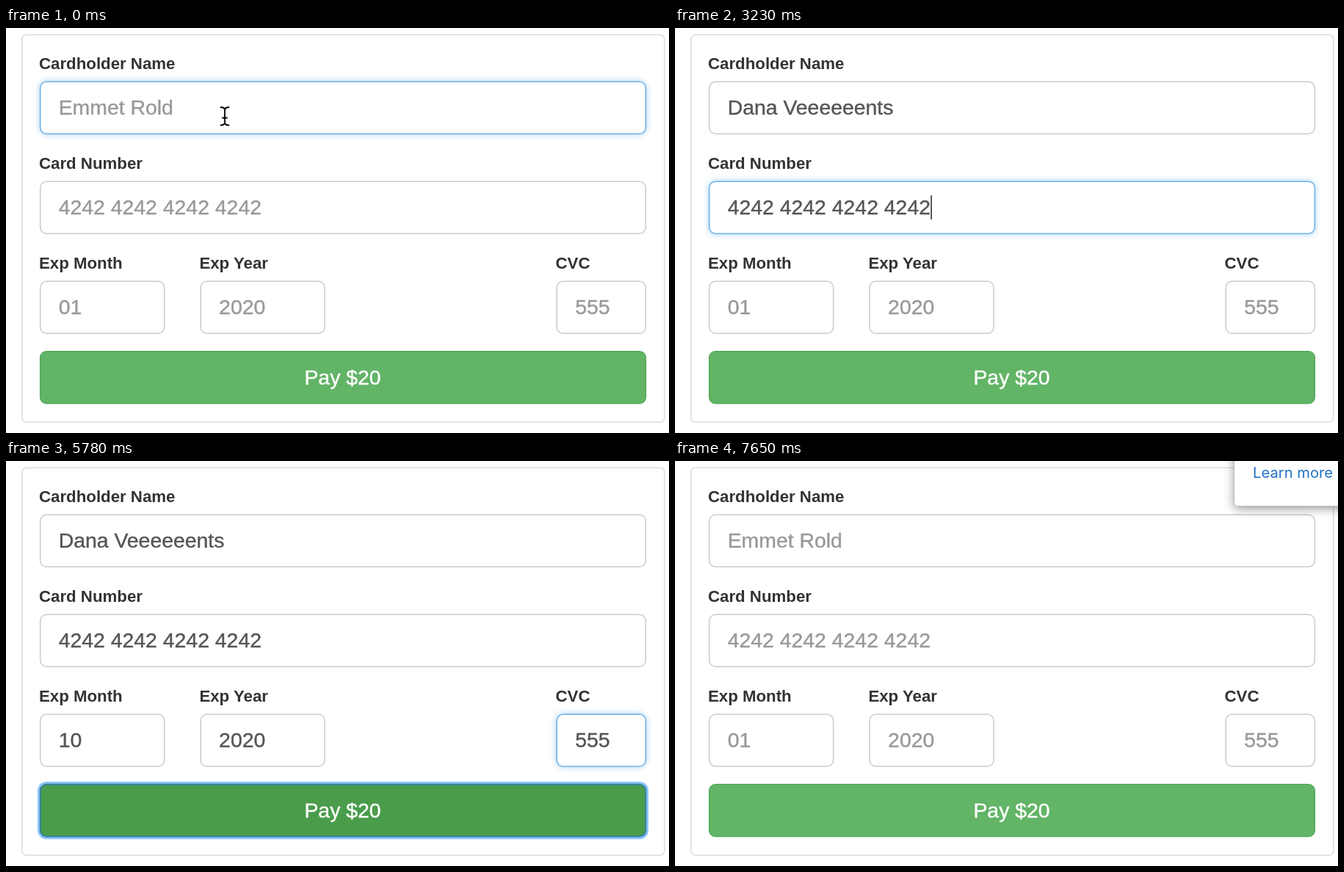
Animation, 903 px wide and 552 px high, one loop 7.82 s. Source, as an HTML page:

```html
<!DOCTYPE html>
<html lang="en">
<head>
<meta charset="utf-8">
<title>Card payment form</title>
<style>
  html, body { margin: 0; width: 100%; height: 100%; overflow: hidden; background: #fff; }
  svg { display: block; font: 28.4px "Liberation Sans", Arial, sans-serif; }
  rect { stroke-width: 1.58; }
  .panel { fill: #fff; stroke: #ddd; }
  .label { font-size: 22.25px; font-weight: bold; fill: #333; }
  .field { fill: #fff; stroke: #ccc; }
  .focus { stroke: #70b3e5; filter: drop-shadow(0 0 4px rgba(102, 175, 233, .6)); }
  .hint, .value, .caption { stroke-width: .4; }
  .hint { fill: #999; stroke: #999; }
  .value { fill: #555; stroke: #555; }
  .caret { fill: #333; }
  .list { fill: #fff; stroke: #a9c8e6; }
  .option { font: bold 19.75px "DejaVu Sans", sans-serif; }
  .pay { fill: #62b467; stroke: #55a95a; }
  .pressed { fill: #4a9c4b; stroke: #3781a6; stroke-width: 2; }
  .ring { fill: none; stroke: #8fc6fc; stroke-width: 4; filter: blur(.5px); }
  .waiting { fill: #9ed0a1; stroke: #95cb99; }
  .caption { fill: #fff; stroke: #fff; text-anchor: middle; }
  .popup { fill: #fff; stroke: #bbb; stroke-width: 1; filter: drop-shadow(0 3px 7px rgba(0, 0, 0, .4)); }
  .link { font: 20.2px Inter, sans-serif; fill: #2472c4; }
  .pointer { fill: none; stroke-linecap: round; }
</style>
</head>
<body>
<svg id="stage" width="903" height="552" viewBox="0 0 903 552"></svg>
<script>
const STEP = 170, STEPS = 46;
const stage = document.getElementById('stage');

// start: step after which typing begins; rate: characters per step
const fields = [
  { label: 'Cardholder Name', x: 46, y: 73, w: 826, hint: 'Emmet Rold', value: 'Dana Veeeeeents', start: 0, rate: 1 },
  { label: 'Card Number', x: 46, y: 209, w: 826, hint: '4242 4242 4242 4242', value: '4242 4242 4242 4242', start: 16, rate: 7 },
  { label: 'Exp Month', x: 46, y: 345, w: 170.4, hint: '01', value: '10', start: 22, rate: 1, list: [23, 24] },
  { label: 'Exp Year', x: 264.4, y: 345, w: 170.4, hint: '2020', value: '2020', start: 25, rate: 1, list: [26, 29] },
  { label: 'CVC', x: 749.5, y: 345, w: 122.5, hint: '555', value: '555', start: 30, rate: 1 }
];
const focusEnds = [16, 20, 25, 30, 35];
const PRESS = 34, WAIT = 36, BLANK = 44, RESET = 45;

const rect = (cls, x, y, w, h, r = 0) =>
  `<rect class="${cls}" x="${x}" y="${y}" width="${w}" height="${h}" rx="${r}"/>`;
const text = (cls, x, y, str) => `<text class="${cls}" x="${x}" y="${y}">${str}</text>`;

function drawField(f, k, focused) {
  const count = k === RESET ? 0 : Math.max(0, (k - f.start) * f.rate);
  const typed = f.value.slice(0, count);
  return text('label', f.x - 1, f.y - 16.6, f.label) +
    rect('field' + (focused ? ' focus' : ''), f.x + .7, f.y + .2, f.w - 1.4, 71, 8.5) +
    text((typed ? 'value' : 'hint') + (focused ? ' active' : ''), f.x + 25.7, f.y + 44.8, typed || f.hint);
}

function drawButton(k) {
  const waiting = k >= WAIT && k < BLANK;
  const pressed = k >= PRESS && k < WAIT;
  const state = waiting ? 'waiting' : pressed ? 'pressed' : '';
  return (pressed ? rect('ring', 45, 439, 828, 74.5, 10) : '') +
    rect('pay ' + state, 46.7, 440.8, 824.6, 71, 8.5) +
    text('caption', 458.5, 485.6, waiting ? 'Please wait...' : 'Pay $20');
}

function drawList(f) {
  return rect('list', f.x - .6, f.y + 72.3, f.w, 40) +
    text('option', f.x + 13, f.y + 100.3, f.value);
}

function drawPointer() {
  const d = 'M292.5 108q5 0 5.5 3.5q.5-3.5 5.5-3.5M298 111V129M292.5 132.5q5 0 5.5-3.5q.5 3.5 5.5 3.5M295 122.5h6';
  return `<path class="pointer" d="${d}" stroke="#fff" stroke-width="4"/>` +
    `<path class="pointer" d="${d}" stroke="#000" stroke-width="1.8"/>`;
}

function addCaret(f) {
  const el = stage.querySelector('.active');
  const width = el.classList.contains('value') ? el.getComputedTextLength() : 0;
  stage.insertAdjacentHTML('beforeend', rect('caret', f.x + 26 + width, f.y + 19, 1.6, 33));
}

function draw(k) {
  if (k === BLANK) {
    stage.innerHTML = '';
    return;
  }
  const focus = k === RESET ? -1 : focusEnds.findIndex(end => k < end);
  let out = rect('panel', 21.8, 9.3, 875, 528, 6);
  out += fields.map((f, i) => drawField(f, k, i === focus)).join('') + drawButton(k);
  for (const f of fields)
    if (f.list && k >= f.list[0] && k <= f.list[1]) out += drawList(f);
  if (k === 0) out += drawPointer();
  if (k === RESET) out += rect('popup', 761.5, -40, 180, 101.5, 4) + text('link', 787, 23, 'Learn more');
  stage.innerHTML = out;
  // the caret blinks off once while the month field is idle
  if (focus >= 0 && k > 0 && k < PRESS && k !== 22) addCaret(fields[focus]);
}

let shown = -1;
const begin = performance.now();
function tick() {
  const k = Math.floor((performance.now() - begin) / STEP) % STEPS;
  if (k !== shown) draw(shown = k);
  requestAnimationFrame(tick);
}
tick();
</script>
</body>
</html>
```
